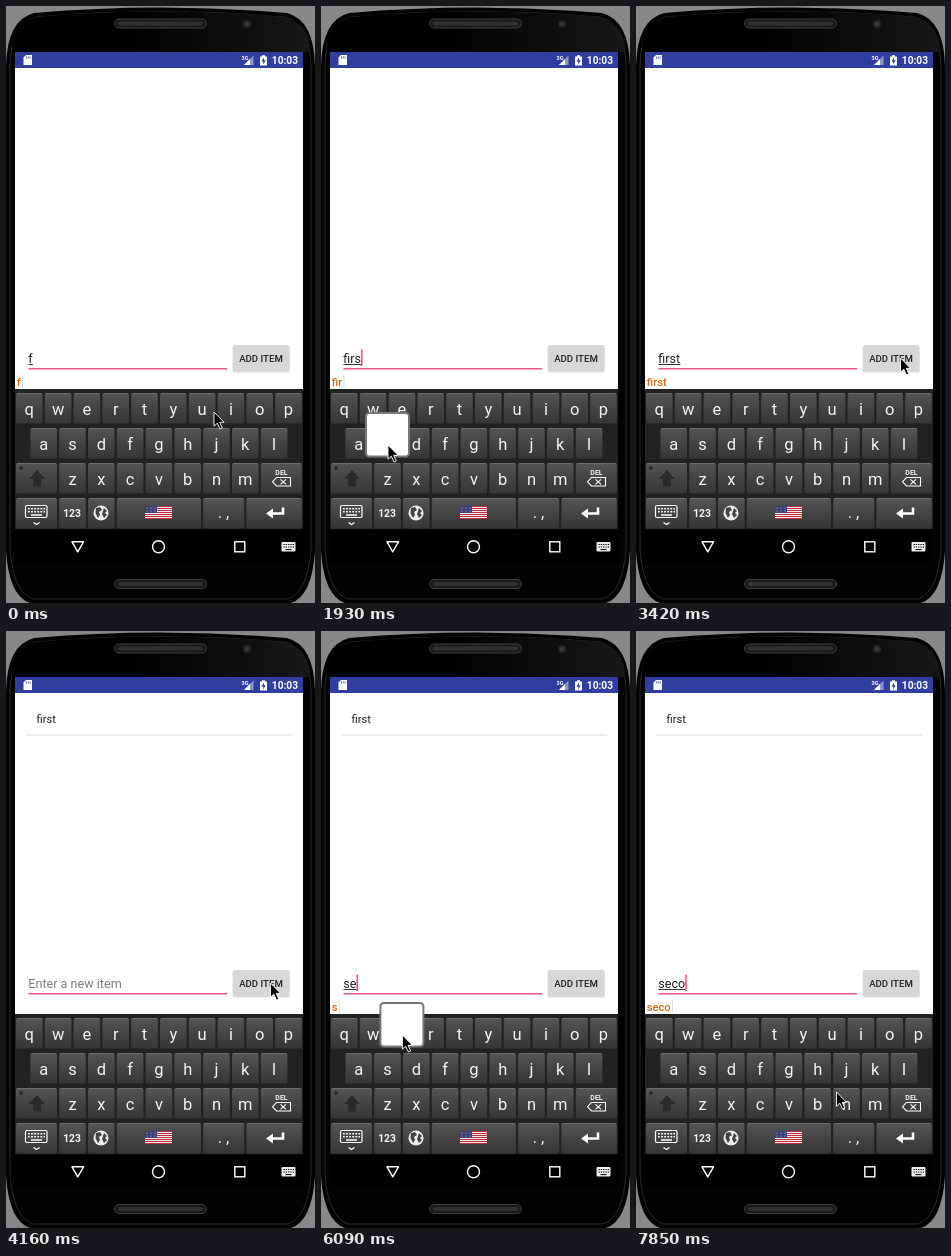
An HTML page for the animation above (8 s loop, 309 by 597 pixels).

```html
<!DOCTYPE html>
<html lang="en">
<head>
<meta charset="utf-8">
<title>Add item</title>
<style>
  html, body { margin: 0; width: 100%; height: 100%; overflow: hidden; background: #888; }
  svg { display: block; width: 309px; height: 597px; font-family: Roboto, sans-serif; }
  .mid { text-anchor: middle; }
  .key { fill: url(#keyFill); }
  .label { font-size: 16.5px; fill: #f4f4f4; text-anchor: middle; }
  .field { font-size: 12.6px; fill: #222; }
  .line { fill: none; stroke: #fff; stroke-width: 1.4; }
</style>
</head>
<body>
<svg viewBox="0 0 309 597">
  <defs>
    <linearGradient id="keyFill" x2="0" y2="1">
      <stop offset="0" stop-color="#555"/>
      <stop offset=".5" stop-color="#444"/>
      <stop offset="1" stop-color="#363636"/>
    </linearGradient>
    <linearGradient id="gloss">
      <stop offset=".4" stop-color="#000"/>
      <stop offset="1" stop-color="#181818"/>
    </linearGradient>
    <g id="speaker">
      <rect x="108.5" y=".5" width="92" height="9" rx="4.5" fill="#1a1a1a" stroke="#3c3c3c"/>
      <rect x="112" y="3" width="85" height="4" rx="2" fill="#303030"/>
    </g>
  </defs>

  <!-- phone -->
  <rect width="309" height="597" fill="#888"/>
  <path d="M0 60Q1 14 28 7Q154 -4 281 7Q308 14 309 60V545Q306 590 285 597H24Q3 590 0 545Z" fill="#030303"/>
  <path d="M4 60Q5 18 30 11Q154 0 279 11Q304 18 305 60V543Q302 586 282 593H27Q7 586 4 543Z" fill="#030303" stroke="#2a2a2a"/>
  <path d="M30 11Q154 0 279 11Q304 18 304 46H6Q6 18 30 11Z" fill="url(#gloss)"/>
  <use href="#speaker" y="12.5"/>
  <use href="#speaker" y="573"/>
  <circle cx="241" cy="18" r="4" fill="#262626"/>
  <circle cx="241" cy="18" r="2" fill="#3a3a3f"/>

  <!-- status bar -->
  <rect x="9" y="46" width="288" height="337" fill="#fff"/>
  <rect x="9" y="46" width="288" height="16" fill="#303f9f"/>
  <path d="M20 49H26V59H17.500V51.500Z" fill="#fff"/>
  <path d="M20.500 50.500V52.500M22.300 50.500V52.500M24.100 50.500V52.500" stroke="#303f9f" stroke-width=".8"/>
  <text x="235.5" y="53.5" font-size="5.5" font-weight="700" fill="#fff">3G</text>
  <path d="M238 59L247.500 49.500V59Z" fill="#fff" fill-opacity=".45"/>
  <path d="M238 59L244 53V59Z" fill="#fff"/>
  <path d="M254 50.500H256V49.300H259V50.500H261V59.500H254Z" fill="#fff"/>
  <path d="M258 51.500L255.500 55.500H257.200V58.500L259.700 54.300H258Z" fill="#303f9f"/>
  <text x="265.8" y="58" font-size="10.2" font-weight="700" fill="#fff">10:03</text>

  <!-- list -->
  <g id="list">
    <text x="30.5" y="92" font-size="11.2" fill="#222">first</text>
    <rect x="20" y="103.5" width="266" height="1" fill="#dcdcdc"/>
  </g>

  <!-- entry row -->
  <text id="hint" class="field" x="22.3" y="356.5" style="fill:#7d7d7d">Enter a new item</text>
  <text id="entry" class="field" x="22.3" y="356.5"></text>
  <rect id="under" x="22.5" y="358" height="1" fill="#333"/>
  <rect x="22.5" y="362" width="198.5" height="1.5" fill="#f0528a"/>
  <rect id="caret" y="343.5" width="1.5" height="16.5" fill="#ff4081"/>
  <rect x="226.5" y="340" width="57.3" height="26.5" rx="2" opacity=".13"/>
  <rect id="button" x="227" y="339" width="56.3" height="26.5" rx="1.6"/>
  <text class="mid" x="255" y="355.5" font-size="9.65" font-weight="500" fill="#222">ADD ITEM</text>
  <text id="guess" x="10.7" y="380" font-size="11.2" font-weight="500" fill="#d9690f"></text>
  <rect id="bar" y="369" width="1" height="13" fill="#ddd"/>

  <!-- keyboard -->
  <rect x="9" y="383" width="288" height="140.5" fill="#222"/>
  <g id="keys"></g>
  <g fill="#2b2b2b">
    <circle cx="15" cy="462" r="2"/>
    <path d="M31 464L39 473H35V480.500H27V473H23Z"/>
  </g>
  <text class="mid" x="275.500" y="468.500" font-size="7" font-weight="700" fill="#eee">DEL</text>
  <path d="M266.500 475.800L270.500 471.500H284.500V480H270.500ZM274.500 473.300L280 478.300M280 473.300L274.500 478.300" class="line" style="stroke-width:1.1"/>
  <rect x="19.5" y="499.5" width="21.5" height="12" rx="1.5" class="line" style="stroke-width:1.2"/>
  <path d="M22 502.800H39M22 505.800H39" class="line" stroke-dasharray="1.8 1.3"/>
  <path d="M25 509H36M27.500 516.500L30.500 518.500L33.500 516.500" class="line"/>
  <text class="mid" x="66" y="510.7" font-size="10.3" font-weight="700" fill="#f4f4f4">123</text>
  <circle cx="95" cy="507" r="7.5" fill="#eee"/>
  <path d="M90 502L94 501L96 504L93 506L94 509L92 512L89.500 507ZM98 502L101 505L99 507L101 509L98 512L96 508Z" fill="#444"/>
  <g id="flag"></g>
  <text class="label" x="217.5" y="512">. ,</text>
  <path d="M277 501.500V507.500H264" class="line" style="stroke-width:2.6"/>
  <path d="M260 507.500L267 502.500V512.500Z" fill="#fff"/>

  <!-- navigation -->
  <rect x="9" y="523.5" width="288" height="33" fill="#000"/>
  <path d="M66 535.800H77.500L71.750 545.800Z" class="line" stroke-linejoin="round"/>
  <circle cx="152.5" cy="540.8" r="6" class="line"/>
  <rect x="228.8" y="535.8" width="10" height="10" class="line"/>
  <rect x="275.5" y="536" width="14" height="9.5" rx="1" fill="#eee"/>
  <path d="M277.500 538.500H288M277.500 541H288" stroke="#000" stroke-width="1.2" stroke-dasharray="1.3 1"/>
  <path d="M279.500 543.600H285.500" stroke="#000"/>

  <rect id="popup" width="43" height="43.5" rx="3.5" fill="#fff" stroke="#777" stroke-width="2"/>
  <path id="mouse" d="M0 0V14.200L3.300 11.200L6 17L8.300 16L5.700 10.300H10Z" fill="#000" stroke="#fff" stroke-width=".9"/>
</svg>

<script>
const LOOP = 8000;
const TICK = LOOP / 54;
const BLINK = 500;
const PITCH = 28.8;
const $ = id => document.getElementById(id);
const rows = ["qwertyuiop", "asdfghjkl", "zxcvbnm"];
const indent = [0, .5, 1.5];
const rowTop = r => 387 + 35 * r;

// centre of a letter key and its row
function place(letter) {
  const r = rows.findIndex(row => row.includes(letter));
  return { x: 23.3 + PITCH * (rows[r].indexOf(letter) + indent[r]), r };
}

// a key spanning the given number of letter columns
function keyBox(column, r, span = 1) {
  const x = 10 + PITCH * column, w = PITCH * span - 2.2;
  return `<rect class="key" x="${x}" y="${rowTop(r)}" width="${w}" height="30.5" rx="1.5"/>
    <rect x="${x + 1}" y="${rowTop(r)}" width="${w - 2}" height="1" fill="#fff" opacity=".14"/>`;
}

function drawKeys() {
  let out = keyBox(0, 2, 1.5) + keyBox(8.5, 2, 1.5);
  rows.forEach((row, r) => [...row].forEach((c, i) => {
    out += keyBox(i + indent[r], r) +
      `<text class="label" x="${place(c).x}" y="${rowTop(r) + 21.5}">${c}</text>`;
  }));
  let column = 0;
  for (const span of [1.5, 1, 1, 3, 1.5, 2]) {
    out += keyBox(column, 3, span);
    column += span;
  }
  $("keys").innerHTML = out;
}

function drawFlag() {
  let out = '<rect x="139" y="500" width="27" height="13" fill="#eee"/>';
  for (let i = 0; i < 7; i++) out += `<rect x="139" y="${500 + 2 * i}" width="27" height="1" fill="#c02a3a"/>`;
  out += '<rect x="139" y="500" width="12" height="7" fill="#3c3f78"/>';
  for (let i = 0; i < 6; i++) out += `<circle cx="${141 + 4 * (i % 3)}" cy="${502 + 3 * (i / 3 | 0)}" r=".6" fill="#ccc"/>`;
  $("flag").innerHTML = out;
}

// the hand's script, in ticks: travel to a key, then press it
const start = [208, 406];
const taps = [
  { key: "f", press: -4 },
  { key: "i", leave: 1, arrive: 3, press: 4 },
  { key: "r", leave: 4, arrive: 6, press: 8.6, aim: [103.5, 405] },
  { key: "s", leave: 8, arrive: 10, press: 13 },
  { key: "t", leave: 14, arrive: 16, press: 17 },
  { key: "add", leave: 18, arrive: 21, press: 24.5, aim: [264.5, 352] },
  { key: "s", leave: 28, arrive: 34, press: 35 },
  { key: "e", leave: 36, arrive: 37, press: 41 },
  { key: "c", leave: 42, arrive: 44, press: 47 },
  { key: "o", leave: 48, arrive: 50, press: 51 },
  { key: "n", leave: 51, arrive: 53, press: 55, aim: [200.5, 461] },
];
const add = taps.find(tap => tap.key === "add");

function aimOf({ key, aim }) {
  if (aim) return aim;
  const { x, r } = place(key);
  return [x + .5, rowTop(r) + 17];
}

const textAt = n => taps.filter(tap => tap.press <= n)
  .reduce((text, { key }) => key === "add" ? "" : text + key, "");

const smooth = u => u * u * (3 - 2 * u);

function mouseAt(n) {
  let pos = start;
  for (const tap of taps) {
    if (!(n > tap.leave)) continue;
    const u = smooth(Math.min(1, (n - tap.leave) / (tap.arrive - tap.leave)));
    const to = aimOf(tap);
    pos = pos.map((p, i) => p + (to[i] - p) * u);
  }
  return pos;
}

const show = (id, on) => $(id).style.display = on ? "" : "none";

function set(id, attrs) {
  for (const name in attrs) $(id).setAttribute(name, attrs[name]);
}

function write(id, text) {
  const el = $(id);
  if (el.textContent !== text) el.textContent = text;
  return text ? el.getComputedTextLength() : 0;
}

function draw(t) {
  const n = Math.floor((t + 8) / TICK);
  const text = textAt(n), word = textAt(n - 1);
  const last = taps.findLast(tap => tap.press <= n);
  const since = n - last.press;

  const width = write("entry", text);
  set("under", { width });
  set("caret", { x: 22.3 + width });
  set("bar", { x: 12 + write("guess", word) });
  show("hint", !text);
  show("bar", word && word !== "first");
  show("caret", Math.floor(since * TICK / BLINK) % 2 === 0);
  show("list", n >= add.press);
  set("button", { fill: Math.abs(n - add.press) < 1 ? "#c6c7c7" : "#d6d7d7" });

  // the bubble lasts less than a tick
  const bubble = since < .3 && last !== add;
  show("popup", bubble);
  if (bubble) {
    const { x, r } = place(last.key);
    set("popup", { x: x - 21.5, y: rowTop(r) - 15 });
  }
  set("mouse", { transform: `translate(${mouseAt(n)})` });
}

drawKeys();
drawFlag();
const begin = performance.now();
function loop() {
  draw((performance.now() - begin) % LOOP);
  requestAnimationFrame(loop);
}
loop();
</script>
</body>
</html>
```
